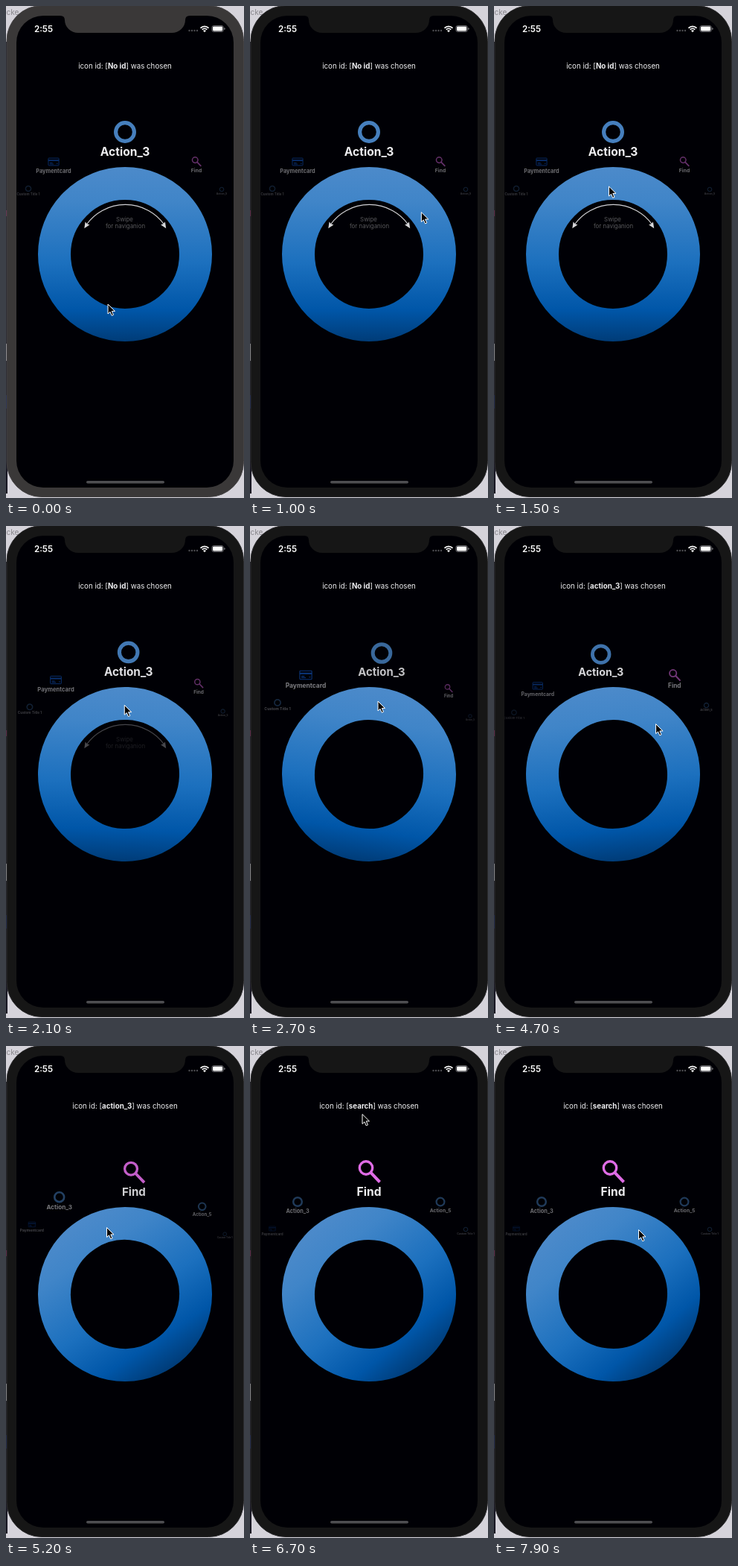
These frames come from a looping animation (320 by 660 pixels, 8 s). An HTML page:

```html
<!DOCTYPE html>
<html lang="en">
<head>
<meta charset="utf-8">
<title>Wheel menu</title>
<style>
  html, body { margin: 0; width: 100%; height: 100%; overflow: hidden; background: #d5d3da; }
  svg { display: block; width: 100%; height: 100%; font-family: Inter, "Liberation Sans", sans-serif; }
  .mid { text-anchor: middle; }
  .label { font-size: 15.6px; font-weight: 700; fill: #ededf0; }
</style>
</head>
<body>
<svg viewBox="0 0 320 660">
  <defs>
    <linearGradient id="blue" gradientUnits="userSpaceOnUse" x1="160" y1="216" x2="160" y2="450">
      <stop offset="0" stop-color="#4c8aca"/>
      <stop offset=".2" stop-color="#4085c8"/>
      <stop offset=".55" stop-color="#1c70be"/>
      <stop offset=".82" stop-color="#0056a8"/>
      <stop offset="1" stop-color="#003c78"/>
    </linearGradient>
    <clipPath id="screen"><rect x="14" y="13" width="292" height="633" rx="36"/></clipPath>
  </defs>

  <!-- desktop behind the phone -->
  <rect width="320" height="660" fill="#d5d3da"/>
  <rect y="48" width="2" height="606" fill="#1b1a26"/>
  <rect y="274" width="2" height="8" fill="#8a2c60"/>
  <rect y="453" width="2" height="23" fill="#d8d8dc"/>
  <rect y="522" width="2" height="18" fill="#1d2c66"/>
  <text x="-2" y="11.5" font-size="10" fill="#88868c">icke</text>

  <!-- phone -->
  <rect id="bezel" x="1" y="-.5" width="318.5" height="659" rx="47"/>
  <rect x="14" y="13" width="292" height="633" rx="36" fill="#000005"/>
  <path id="notch" d="M73 12H247V13Q241 13 241 19A18 17 0 0 1 223 36H97A18 17 0 0 1 79 19Q79 13 73 13Z"/>
  <text x="50.5" y="34.8" class="mid" font-size="11.6" font-weight="600" fill="#fff">2:55</text>
  <g fill="#4c4c50">
    <circle cx="246.5" cy="33" r="1.2"/><circle cx="250" cy="33" r="1.2"/>
    <circle cx="253.500" cy="33" r="1.2"/><circle cx="257" cy="33" r="1.2"/>
  </g>
  <g fill="none" stroke="#fff" stroke-width="1.7">
    <path d="M261.5 29.600A7.800 7.800 0 0 1 272.500 29.600"/>
    <path d="M263.700 31.700A4.700 4.700 0 0 1 270.300 31.700"/>
  </g>
  <path d="M267 35.200L265 33.100A2.900 2.900 0 0 1 269 33.100Z" fill="#fff"/>
  <rect x="276.900" y="26.500" width="15.400" height="8" rx="2.300" fill="none" stroke="#8a8a8e" stroke-width=".8"/>
  <rect x="278" y="27.600" width="13.200" height="5.800" rx="1.300" fill="#fff"/>
  <path d="M293.400 29v3q1.200 -.4 1.200 -1.500t-1.200 -1.500" fill="#8a8a8e"/>
  <rect x="108" y="637" width="105" height="3.600" rx="1.800" fill="#4e4e51"/>

  <text x="160" y="84.400" class="mid" font-size="9.750" fill="#f0f0f2">icon id: [<tspan id="chosen" font-weight="700"></tspan>] was chosen</text>

  <circle id="wheel" cx="160" cy="333" r="95" fill="none" stroke="url(#blue)" stroke-width="44"/>

  <g id="hint">
    <path d="M108 293.500A64.500 64.500 0 0 1 213 293.500" fill="none" stroke="#cfcfd2" stroke-width="1.200"/>
    <path id="head" d="M105.300 298.200L106.600 289.500L108.900 292.300L112.400 293.400Z" fill="#d8d8da"/>
    <use href="#head" transform="translate(320.500 0) scale(-1 1)"/>
    <g class="mid" font-size="7.900" fill="#58585b">
      <text x="159.500" y="288.800">Swipe</text>
      <text x="160.500" y="298.300">for naviganion</text>
    </g>
  </g>

  <g id="items" clip-path="url(#screen)"></g>

  <path id="cursor" d="M0 0V13L3 10.300L5.200 15.300L7.500 14.300L5.300 9.400H9.500Z" fill="#050505" stroke="#fff" stroke-width="1" stroke-linejoin="round"/>
</svg>

<script>
const LOOP = 8000, TICK = 100;
const $ = id => document.getElementById(id);

const ring = '<circle r="12.4" fill="none" stroke="#467fbd" stroke-width="5.2"/>';
const card = '<g fill="none" stroke="#1462dc" stroke-width="2"><rect x="-15" y="-10.500" width="30" height="21" rx="1.500"/>' +
  '<path d="M-15 -4H15" stroke-width="4"/><path d="M-11 3H-3M-11 6.500H0M8 5H12"/></g>';
const lens = '<g fill="none" stroke="#df6ce6" stroke-width="3.400"><circle cx="-4" cy="-5.500" r="8.700"/>' +
  '<path d="M2.200 .7L14.500 13.500" stroke-width="4"/></g>';

const menu = [
  ['Action_3', ring], ['Find', lens], ['Action_5', ring],
  ['Custom Title 1', ring], ['Paymentcard', card]
];

// slot: x, icon y, scale, opacity
const slots = [
  [-2.5, 20, 262, .2, 0],
  [-2, 30, 245, .29, .23],
  [-1.8, 37, 237, .33, .3],
  [-1, 64, 209, .47, .46],
  [-.8, 75, 200, .54, .53],
  [-.4, 118, 177, .78, .75],
  [0, 160, 169, 1, 1],
  [.2, 177, 170.5, .955, .82],
  [.6, 222, 187, .68, .6],
  [1, 256, 209, .435, .45],
  [1.2, 267, 218, .37, .4],
  [2, 290, 246, .22, .24],
  [2.2, 296, 255, .18, .2],
  [2.5, 301, 268, .13, 0]
];

// time: wheel position in slots
const turn = [[1900, 0], [2300, -.11], [2700, -.2], [2800, -.19], [3200, 0], [4600, 0], [5000, .62], [5200, .86], [5400, 1]];
const fade = [[1900, 1], [2200, 0]];

// time: cursor tip
const path = [
  [100, 137, 400], [200, 84, 367], [300, 53, 300], [400, 76, 228], [500, 150, 184],
  [600, 226, 206], [700, 277, 268], [900, 248, 288], [1200, 195, 254], [1500, 154.5, 242],
  [1900, 155, 242], [2700, 172, 235], [2800, 173, 235], [3200, 164, 195], [3400, 160, 174],
  [3700, 161, 180], [3900, 170.5, 294], [4100, 205, 372], [4300, 270, 325], [4500, 238, 274],
  [4600, 234, 270], [5200, 135.5, 243.5], [5400, 126, 248], [5900, 160, 175], [6300, 160, 168],
  [6500, 154, 112], [6700, 151, 91.5], [7200, 154, 84.5], [7600, 155, 84.5], [7900, 194.5, 246.5]
];

// Linear lookup; returns the values that follow the key.
function sample(table, key) {
  const n = table.findIndex(row => row[0] >= key);
  if (n === 0) return table[0].slice(1);
  if (n < 0) return table[table.length - 1].slice(1);
  const a = table[n - 1], b = table[n], k = (key - a[0]) / (b[0] - a[0]);
  return a.slice(1).map((v, i) => v + (b[i + 1] - v) * k);
}

$('items').innerHTML = menu.map(([name, icon]) =>
  `<g>${icon}<text class="label mid" y="31.500">${name}</text></g>`).join('');
const items = [...$('items').children];
const wrap = p => ((p + 2.5) % 5 + 5) % 5 - 2.5;

function draw(t) {
  const dark = t >= 1000;
  $('bezel').setAttribute('fill', dark ? '#161616' : '#3a3838');
  $('bezel').setAttribute('stroke', dark ? '#2c2c2e' : '#454344');
  $('notch').setAttribute('fill', dark ? '#161616' : '#3a3838');

  const pos = sample(turn, t)[0];
  $('wheel').setAttribute('transform', `rotate(${-39 * pos} 160 333)`);
  items.forEach((el, i) => {
    const [x, y, s, o] = sample(slots, wrap(i - pos));
    el.setAttribute('transform', `translate(${x} ${y}) scale(${s})`);
    el.setAttribute('opacity', o);
  });

  $('hint').setAttribute('opacity', sample(fade, t)[0]);
  $('chosen').textContent = t < 3700 ? 'No id' : t < 6400 ? 'action_3' : 'search';
  $('cursor').setAttribute('transform', `translate(${sample(path, t).join(' ')})`);
}

const start = performance.now();
function frame() {
  const t = (performance.now() - start) % LOOP;
  draw(Math.floor(t / TICK) * TICK);
  requestAnimationFrame(frame);
}
frame();
</script>
</body>
</html>
```
